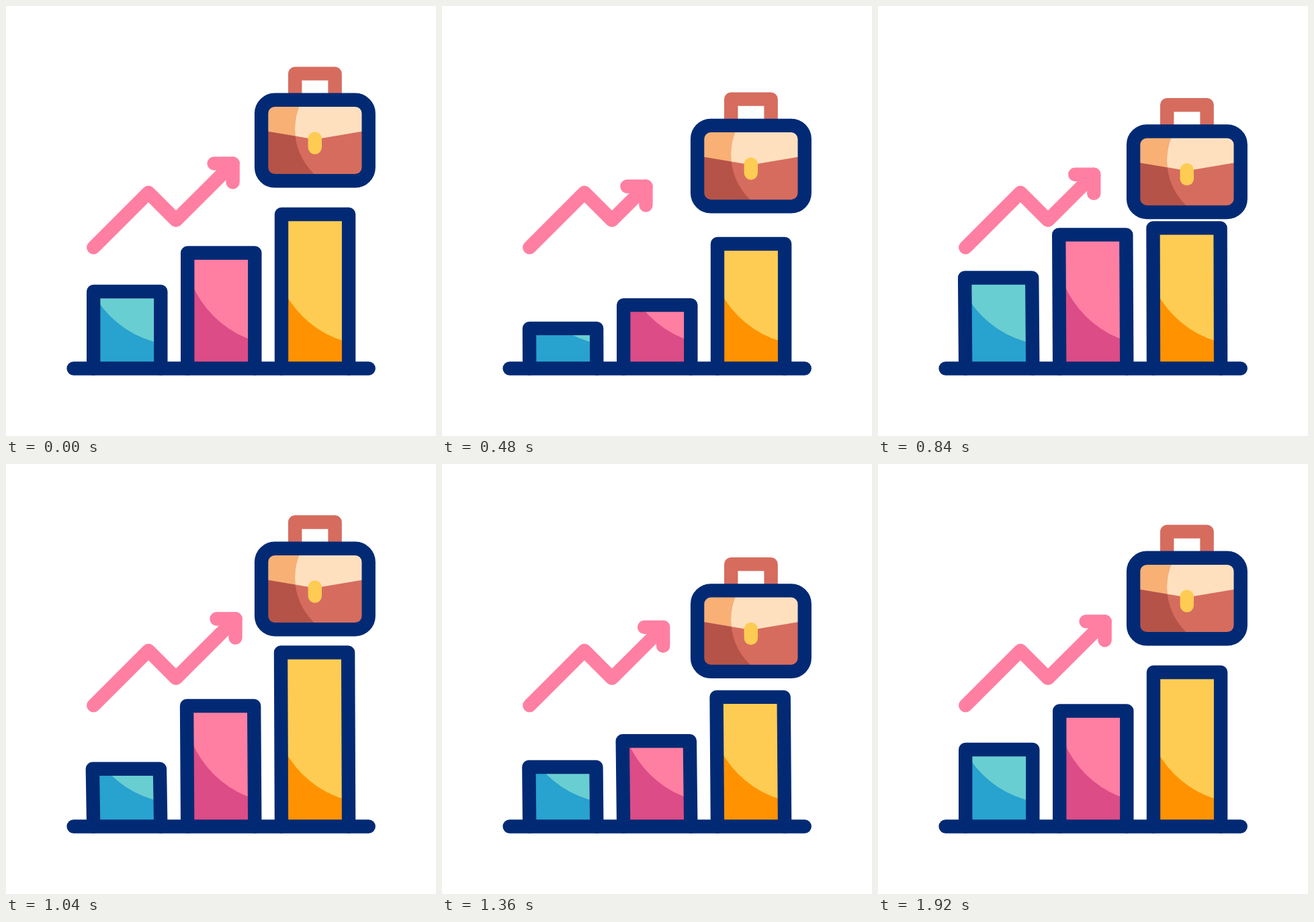
Write an HTML page with a canvas that moves like this. It is 640 by 640 pixels and loops after 2.4 s.

```html
<!DOCTYPE html>
<html lang="en">
<head>
<meta charset="utf-8">
<title>Business growth</title>
<style>
html, body { margin: 0; height: 100%; overflow: hidden; background: #fff; }
canvas { display: block; }
</style>
</head>
<body>
<canvas id="stage" width="640" height="640"></canvas>
<script>
const ctx = document.getElementById('stage').getContext('2d');
const LOOP = 2400;
const NAVY = '#022a74', PINK = '#ff7fa2', YELLOW = '#fecc52', BROWN = '#d66c5e';

// Keys are [time, value] pairs, eased in and out between neighbours.
function track(keys, t) {
  if (t <= keys[0][0]) return keys[0][1];
  for (let i = 1; i < keys.length; i++) {
    const [t0, a] = keys[i - 1], [t1, b] = keys[i];
    if (t < t1) return a + (b - a) * (1 - Math.cos(Math.PI * (t - t0) / (t1 - t0))) / 2;
  }
  return keys[keys.length - 1][1];
}

const bounce = (a, b, c) => [[10, 0], [365, a], [740, b], [1180, c], [1575, 0]];
const BAR_Y = bounce(78.5, -30, 46);
const CASE_Y = bounce(89, -14.2, 64);
const BAR_LEAN = [[365, 0], [740, -1], [1180, -1.5], [1575, 0]];
const ARROW = [[150, 0], [560, -37.5], [1140, 7], [1600, -26], [1900, 0]];

const bars = [
  { x: 130.2, top: 425, delay: 0, light: '#69ced1', dark: '#28a2ce', cx: 261 },
  { x: 270.2, top: 367.5, delay: 140, light: PINK, dark: '#dc4c86', cx: 415 },
  { x: 410, top: 310, delay: 280, light: YELLOW, dark: '#ff9200', cx: 547 }
];

function line(color, ...points) {
  ctx.beginPath();
  points.forEach(p => ctx.lineTo(...p));
  ctx.strokeStyle = color;
  ctx.stroke();
}

function disc(x, y, r, color) {
  ctx.beginPath();
  ctx.arc(x, y, r, 0, 2 * Math.PI);
  ctx.fillStyle = color;
  ctx.fill();
}

function drawBar(bar, time) {
  const t = time - bar.delay;
  const y = bar.top + track(BAR_Y, t), lean = track(BAR_LEAN, t);
  const left = bar.x, right = bar.x + 100.1;
  const corners = [[left, 539.5], [left + lean, y], [right + lean, y], [right, 539.5]];
  ctx.save();
  ctx.beginPath();
  corners.forEach(p => ctx.lineTo(...p));
  ctx.clip();
  ctx.fillStyle = bar.dark;
  ctx.fill();
  disc(bar.cx, 355.5, 150, bar.light);
  ctx.restore();
  line(NAVY, ...corners);
}

function caseFill(body, flap) {
  ctx.fillStyle = body;
  ctx.fillRect(380, 140, 160, 120);
  ctx.beginPath();
  [[380, 140], [540, 140], [540, 185], [460, 198.5], [380, 185]].forEach(p => ctx.lineTo(...p));
  ctx.fillStyle = flap;
  ctx.fill();
}

function drawCase(time) {
  ctx.save();
  ctx.translate(0, track(CASE_Y, time - 310));
  line(BROWN, [430.2, 138], [430.2, 100.6], [489.6, 100.6], [489.6, 138]);

  const frame = new Path2D();
  frame.roundRect(380.1, 139.8, 159.6, 120.5, 20);
  ctx.save();
  ctx.clip(frame);
  caseFill('#b55348', '#f8b075');
  ctx.beginPath();
  ctx.arc(523, 183, 93, 0, 2 * Math.PI);
  ctx.clip();
  caseFill(BROWN, '#fee0bf');
  ctx.restore();

  ctx.strokeStyle = NAVY;
  ctx.stroke(frame);
  line(YELLOW, [459.8, 197.5], [459.8, 210.5]);
  ctx.restore();
}

function drawArrow(time) {
  const d = track(ARROW, time), x = 337.6 + d, y = 234.4 - d;
  line(PINK, [130.3, 359.4], [212, 277.7], [253, 318.7], [x, y]);
  line(PINK, [x - 28, y], [x, y], [x, y + 28]);
}

function draw(now) {
  const time = now % LOOP;
  ctx.fillStyle = '#fff';
  ctx.fillRect(0, 0, 640, 640);
  ctx.lineWidth = 20.4;
  ctx.lineCap = ctx.lineJoin = 'round';
  bars.forEach(bar => drawBar(bar, time));
  line(NAVY, [100.6, 539.5], [539.7, 539.5]);
  drawArrow(time);
  drawCase(time);
}

const start = performance.now();
function tick() {
  draw(performance.now() - start);
  requestAnimationFrame(tick);
}
tick();
</script>
</body>
</html>
```
